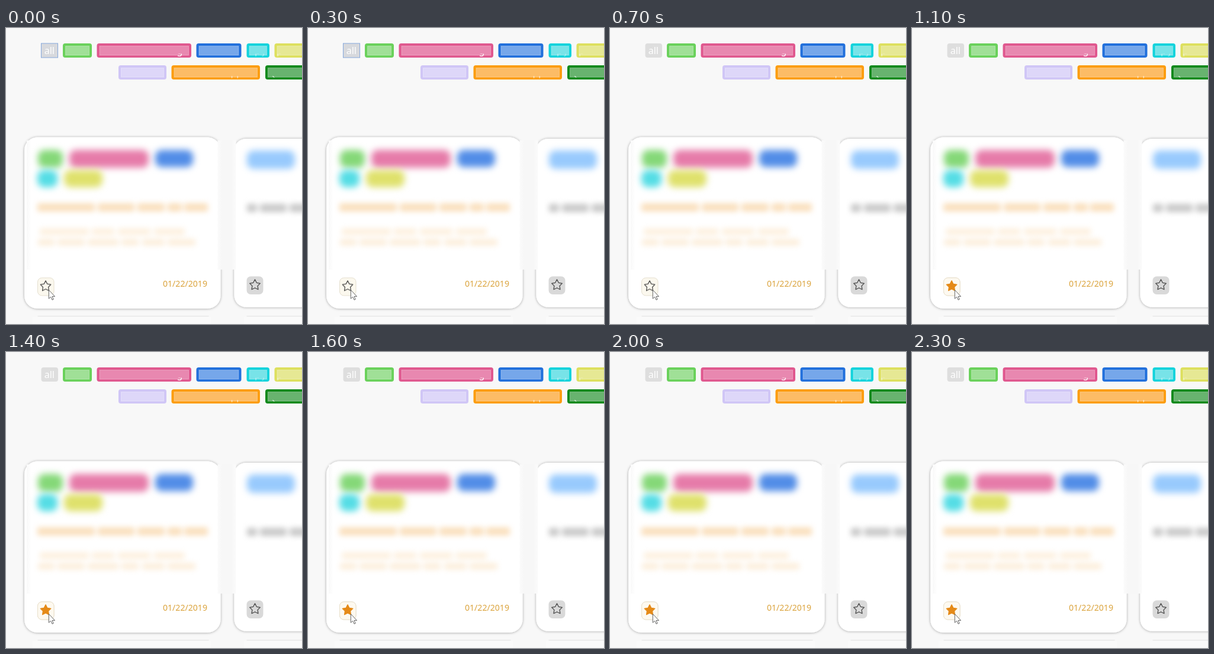
An HTML page for the animation above (2.4 s loop, 500x500 px).

```html
<!DOCTYPE html>
<html lang="en">
<head>
<meta charset="utf-8">
<title>Starring a card</title>
<style>
  html, body { margin: 0; width: 100%; height: 100%; overflow: hidden; background: #f8f8f8; }
  svg { display: block; width: 100vw; height: 100vh; }
  text { font-family: "Noto Sans", "Open Sans", sans-serif; }
  .tag-text { font-size: 16px; fill: #fff; }
  .date { font-size: 14.1px; fill: #dba43e; }
  .card { fill: #fff; filter: url(#shadow); }
  .star { stroke: #454545; stroke-width: 1.25; stroke-linejoin: round; fill: none; }
  .star.on { stroke: #e58a18; fill: #e58a18; }
  .focus { animation: focus 2.4s step-end infinite; }
  .off { animation: off 2.4s step-end infinite; }
  .lit { animation: lit 2.4s step-end infinite; }
  @keyframes focus { 0% { opacity: 1; } 25%, 100% { opacity: 0; } }
  @keyframes off { 0% { opacity: 1; } 37.5%, 100% { opacity: 0; } }
  @keyframes lit { 0% { opacity: 0; } 37.5%, 100% { opacity: 1; } }
</style>
</head>
<body>
<svg viewBox="0 0 500 500">
  <defs>
    <filter id="shadow" x="-10%" y="-10%" width="120%" height="120%">
      <feDropShadow dx="0" dy=".3" stdDeviation="1.9" flood-color="#000" flood-opacity=".36"/>
    </filter>
    <filter id="blur" x="-60%" y="-100%" width="220%" height="300%" color-interpolation-filters="sRGB">
      <feGaussianBlur stdDeviation="6"/>
    </filter>
    <filter id="soft" filterUnits="userSpaceOnUse" x="0" y="0" width="500" height="500" color-interpolation-filters="sRGB">
      <feGaussianBlur stdDeviation="5"/>
    </filter>
    <linearGradient id="gap">
      <stop offset="0" stop-color="#fbfbfb"/>
      <stop offset=".25" stop-color="#f7f7f7"/>
      <stop offset=".75" stop-color="#f7f7f7"/>
      <stop offset="1" stop-color="#fbfbfb"/>
    </linearGradient>
    <linearGradient id="edge">
      <stop offset="0" stop-color="#f9f9f9"/>
      <stop offset="1" stop-color="#fff"/>
    </linearGradient>
    <clipPath id="tails"><path d="M0 43.5H500V51H0ZM0 81H500V88H0Z"/></clipPath>
    <path id="star"/>
  </defs>

  <g id="tags"></g>
  <rect x="59.5" y="26" width="28.5" height="24" rx="4" fill="#dedede"/>
  <rect class="focus" x="59.5" y="26" width="28" height="24" fill="#d7d9dd" stroke="#85a8dc"/>
  <text class="tag-text" x="64.7" y="44">all</text>
  <g class="tag-text" clip-path="url(#tails)">
    <text x="288.5" y="44">g</text>
    <text x="420" y="44" opacity=".5">p</text>
    <text x="433" y="44" opacity=".4">j</text>
    <text x="457" y="44" opacity=".5">p</text>
    <text x="379.5" y="81" opacity=".6">pp</text>
    <text x="443" y="81" opacity=".7">Q</text>
  </g>

  <rect class="card" x="31" y="184.5" width="331.5" height="289.5" rx="22"/>
  <rect class="card" x="385.5" y="187" width="340" height="284.5" rx="20"/>
  <path d="M45 488H346V500H45ZM402 488H500V500H402Z" fill="#fafafa"/>
  <path d="M54 486.8H342M407 486.8H500" stroke="#e9e9e9" stroke-width="1.6" stroke-linecap="round"/>

  <rect x="35" y="190" width="8" height="218" fill="url(#edge)"/>
  <rect x="357.5" y="190" width="31" height="218" fill="url(#gap)"/>

  <g id="chips"></g>
  <g id="words"></g>

  <g>
    <rect x="53.5" y="422" width="27.5" height="30" rx="7" fill="#fbf8ee" stroke="#e5dfcf"/>
    <use class="star off" href="#star" x="67" y="436.2"/>
    <g class="lit">
      <rect x="53.5" y="422" width="27.5" height="30" rx="7" fill="#fdf9f0" stroke="#e9dfca"/>
      <use class="star on" href="#star" x="67" y="436.2"/>
    </g>
    <rect x="406.5" y="419.5" width="28" height="30.5" rx="7" fill="#d9d9d9"/>
    <use class="star" href="#star" x="420.5" y="434.2"/>
  </g>
  <text class="date" x="265" y="436.6">01/22/2019</text>

  <path d="M72.3 442.5V457.2L75.7 454.2L78 459.3L80.2 458.3L78 453.4H82.5Z"
        fill="#fff" stroke="#626262" stroke-width="1" stroke-linejoin="round"/>
</svg>
<script>
  const ns = "http://www.w3.org/2000/svg";
  const $ = id => document.getElementById(id);

  function rect(parent, x, y, width, height, rx, fill, more = {}) {
    const el = document.createElementNS(ns, "rect");
    const attrs = { x, y, width, height, rx, fill, ...more };
    for (const key in attrs) el.setAttribute(key, attrs[key]);
    parent.append(el);
  }

  // left, right, top, frame colour, inner colour
  const tags = [
    [96, 145, 26, "#6ad15b", "#a0e097"],
    [153.5, 313, 26, "#e0588f", "#e888b0"],
    [321.5, 397.5, 26, "#2270dc", "#76a7ea"],
    [406.5, 445, 26, "#14d3dc", "#78e3e8"],
    [453.5, 520, 26, "#dde05e", "#e6e894"],
    [190, 271, 63, "#d0c6f6", "#ded7f9"],
    [279.5, 429, 63, "#fc9d10", "#fcbc66"],
    [438, 520, 63, "#138a1d", "#68b36f"]
  ];
  for (const [l, r, y, frame, inner] of tags) {
    rect($("tags"), l, y, r - l, 24, 4, frame);
    rect($("tags"), l + 4.5, y + 4.5, r - l - 9, 15.5, 0, inner,
      { stroke: "#fff", "stroke-opacity": .3 });
  }

  // left, right, top, bottom, colour
  const chips = [
    [54, 96, 206, 236, "#85d878"],
    [107, 241, 206, 236, "#e67ba9"],
    [252, 316, 206, 235, "#528de7"],
    [53, 87, 240, 269, "#55dde5"],
    [98, 163, 240, 269, "#dfe16c"],
    [407, 488, 207, 238, "#98cafd"]
  ];
  for (const [l, r, t, b, fill] of chips)
    rect($("chips"), l, t, r - l, b - t, 11, fill, { filter: "url(#blur)" });

  // Each line: vertical centre, height, colour, then word start and end pairs
  const lines = [
    [303, 14, "#fae0be", 53, 150, 155, 217, 222, 268, 273, 297, 301, 341],
    [344, 11, "#fdf0de", 57, 140, 145, 183, 189, 244, 250, 302],
    [362, 11, "#fceedb", 54, 82, 87, 133, 138, 190, 195, 224, 230, 268, 273, 320],
    [304, 14, "#cacaca", 407, 424, 429, 474, 479, 510]
  ];
  $("words").setAttribute("filter", "url(#soft)");
  for (const [y, h, fill, ...ends] of lines)
    for (let i = 0; i < ends.length; i += 2)
      rect($("words"), ends[i], y - h / 2, ends[i + 1] - ends[i], h, 3, fill);

  const points = Array.from({ length: 10 }, (_, i) => {
    const r = i % 2 ? 4.8 : 9.3, a = (i / 5 - .5) * Math.PI;
    return `${(r * Math.cos(a)).toFixed(2)} ${(r * Math.sin(a)).toFixed(2)}`;
  });
  $("star").setAttribute("d", `M${points.join("L")}Z`);
</script>
</body>
</html>
```
